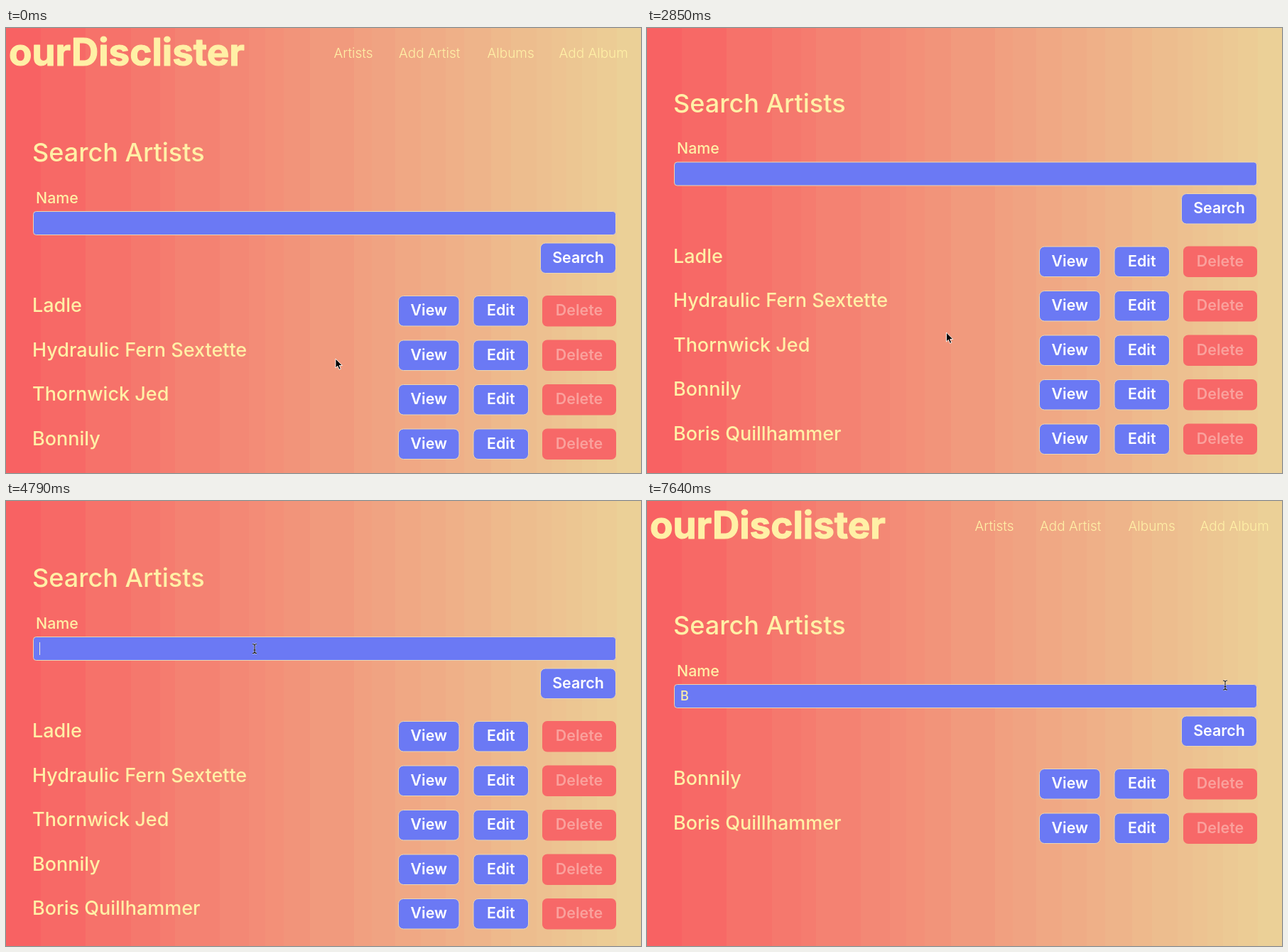
Write an HTML page that moves like this. It is 894 px wide and 627 px high and loops after 8 s.

```html
<!DOCTYPE html>
<html lang="en">
<head>
<meta charset="utf-8">
<title>Search Artists</title>
<style>
  html, body { margin: 0; width: 100%; height: 100%; overflow: hidden; background: #f2a383; }
  svg { display: block; width: 894px; height: 627px; font-family: Inter, "Open Sans", sans-serif; }
  text { fill: #fff0a6; font-weight: 500; white-space: pre; }
  .logo { font-size: 53px; font-weight: 700; stroke: #fff0a6; stroke-width: 1.2; stroke-linejoin: round; }
  .nav { font-size: 19px; font-weight: 300; }
  .title { font-size: 36px; }
  .label { font-size: 21.4px; }
  .artist { font-size: 27px; }
  .typed { font-size: 18px; }
  .btn { font-size: 21.4px; font-weight: 600; fill: #fff; text-anchor: middle; }
  .off { fill: #faa19c; }
  .blue { fill: #6b79f4; stroke: #ead6b4; }
  .red { fill: #f76868; }
</style>
</head>
<body>
<svg id="stage" viewBox="0 0 894 627"></svg>
<script>
const LOOP = 8000;
const RESULTS_AT = 7640;
const TYPED_AT = 5090;
const stage = document.getElementById('stage');

function add(parent, tag, attrs = {}, text = '') {
  const el = document.createElementNS('http://www.w3.org/2000/svg', tag);
  for (const key in attrs) el.setAttribute(key, attrs[key]);
  el.textContent = text;
  parent.append(el);
  return el;
}
const group = parent => add(parent, 'g');
const label = (parent, cls, x, y, text) => add(parent, 'text', { class: cls, x, y }, text);

function box(parent, cls, x, y, w, h, rx) {
  const inset = cls === 'blue' ? 0.5 : 0;
  add(parent, 'rect', {
    class: cls, x: x + inset, y: y + inset, width: w - 2 * inset, height: h - 2 * inset, rx
  });
}

function button(parent, x, y, w, text, off = false) {
  box(parent, off ? 'red' : 'blue', x, y, w, 43.5, 7);
  label(parent, off ? 'btn off' : 'btn', x + w / 2, y + 28, text);
}

// Banded horizontal gradient
const edges = [0, 49, 112, 176, 217, 238, 301, 342, 365, 391, 428, 490, 515, 548, 584,
  619, 645, 683, 711, 747, 768, 789, 811, 832, 860, 894];
const from = [248, 95, 97], to = [235, 210, 152];
edges.slice(0, -1).forEach((x, i) => {
  const end = edges[i + 1], k = (x + end) / 2 / 894;
  const rgb = from.map((c, j) => Math.round(c + (to[j] - c) * k));
  add(stage, 'rect', { x, y: 0, width: end - x, height: 627, fill: `rgb(${rgb})`, 'shape-rendering': 'crispEdges' });
});

// Page
const page = group(stage);
label(page, 'logo', 4, 53, 'ourDisclister');
[[461.5, 'Artists'], [553, 'Add Artist'], [677.5, 'Albums'], [778.5, 'Add Album']]
  .forEach(([x, text]) => label(page, 'nav', x, 42, text));
label(page, 'title', 37, 188, 'Search Artists');
label(page, 'label', 42, 246.5, 'Name');
box(page, 'blue', 38, 258, 821, 34, 4);
button(page, 752, 302.5, 107, 'Search');
const typed = label(page, 'typed', 47, 280.5, 'B');
const caret = add(page, 'rect', { x: 47, y: 266, width: 1, height: 18, fill: '#f3e9d0' });

function list(names) {
  const g = group(page);
  names.forEach((name, i) => {
    const y = 377 + i * 62.5;
    label(g, 'artist', 37, y + 23, name);
    button(g, 552, y, 86.5, 'View');
    button(g, 657.5, y, 78.5, 'Edit');
    button(g, 755, y, 104, 'Delete', true);
  });
  return g;
}
const artists = ['Ladle', 'Hydraulic Fern Sextette', 'Thornwick Jed', 'Bonnily', 'Boris Quillhammer'];
const all = list(artists);
const found = list(artists.filter(name => name.startsWith('B')));

// Pointers
const arrow = add(stage, 'path', {
  d: 'M0 0V13l2.9-2.7 2.1 5 2.3-1-2.1-4.8h4.1z', fill: '#000', stroke: '#fff', 'stroke-width': 0.9
});
const beam = group(stage);
const beamPath = 'M-3-6.5Q0-6.5 0-4.5Q0-6.5 3-6.5M0-4.5V4.5M-3 6.5Q0 6.5 0 4.5Q0 6.5 3 6.5M-1.5 2H1.5';
add(beam, 'path', { d: beamPath, fill: 'none', stroke: '#fff', 'stroke-width': 2.4, opacity: 0.7 });
add(beam, 'path', { d: beamPath, fill: 'none', stroke: '#111', 'stroke-width': 1.1 });

// Held steps: time, value(s)
const scroll = [[0, 0], [2250, 9], [2400, 31], [2550, 52], [2700, 65], [2850, 69.5], [3000, 70], [3150, 69],
  [3300, 58], [3450, 35.5], [3600, 29], [3750, 53], [3900, 67.5], [4050, 67.2], [4200, 67], [RESULTS_AT, 0]];
const blink = [[0, 0], [1950, 1], [2550, 0], [3150, 1], [3750, 0], [4500, 1], [TYPED_AT, 0]];
const pointer = [[0, 464, 466], [900, 434, 441], [1050, 421.5, 429],
  [4050, 412, 396], [4200, 392, 308], [4350, 372, 250], [4500, 354, 212, 1], [4640, 350, 208, 1],
  [5090, 349, 242], [5240, 353, 312], [5390, 359, 372], [5540, 361.5, 401],
  [5840, 382, 394], [5990, 455, 368], [6140, 570, 328], [6290, 688, 290],
  [6440, 768, 267], [6590, 802, 259], [6740, 810.5, 258], [7190, 813.5, 258.5], [RESULTS_AT, 814, 259.5, 1]];

const at = (steps, t) => steps.findLast(step => step[0] <= t);
const show = (el, on) => el.setAttribute('visibility', on ? 'visible' : 'hidden');
const move = (el, x, y) => el.setAttribute('transform', `translate(${x} ${y})`);

function draw(t) {
  move(page, 0, -at(scroll, t)[1]);
  show(caret, at(blink, t)[1]);
  show(typed, t >= TYPED_AT);
  show(all, t < RESULTS_AT);
  show(found, t >= RESULTS_AT);
  const [, x, y, isBeam] = at(pointer, t);
  move(arrow, x, y);
  move(beam, x, y);
  show(arrow, !isBeam);
  show(beam, isBeam);
}

const start = performance.now();
function tick() {
  draw((performance.now() - start) % LOOP);
  requestAnimationFrame(tick);
}
tick();
</script>
</body>
</html>
```
